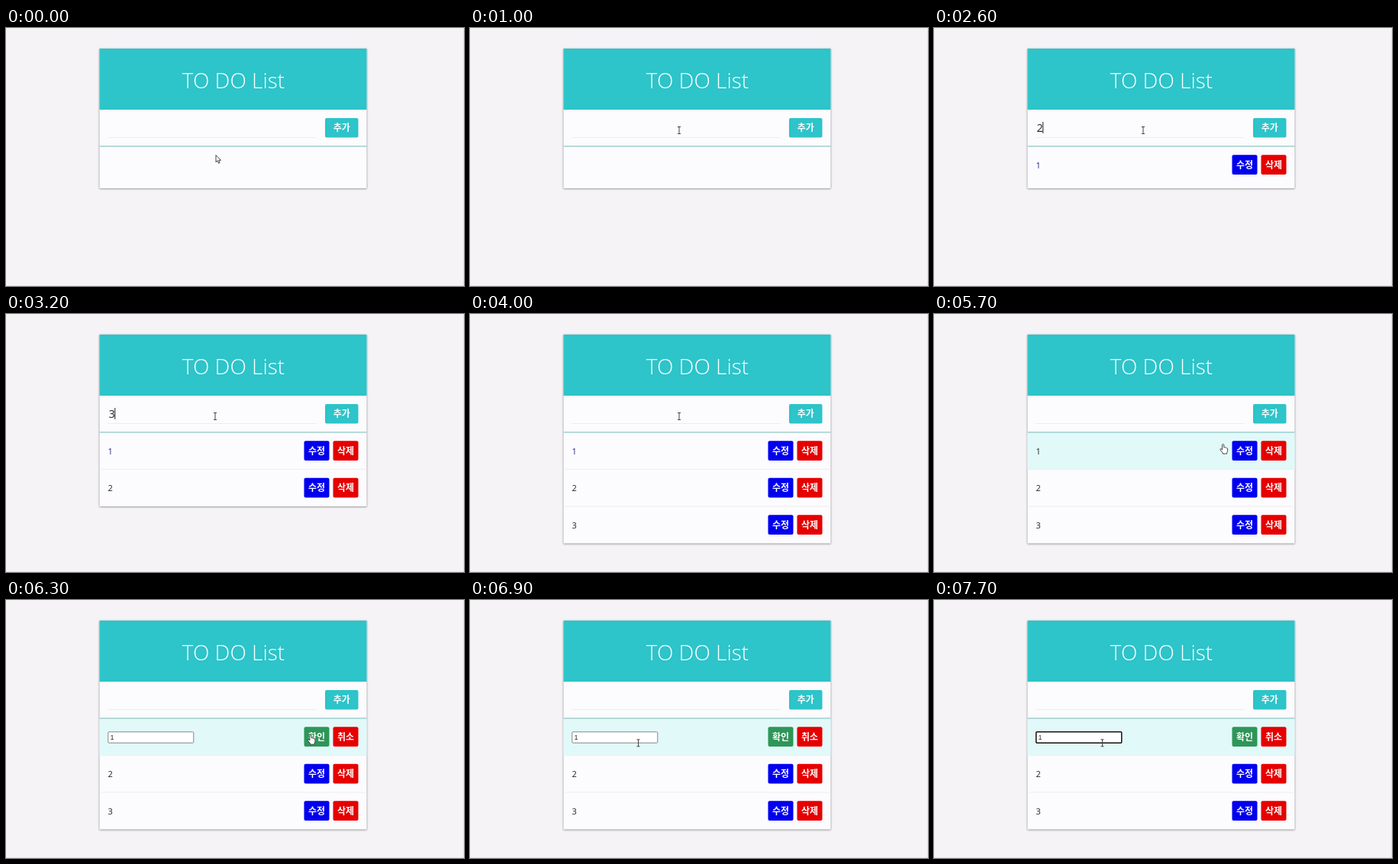
Animation, 600 px wide and 338 px high, one loop 8000 ms. Source, as an HTML page:

```html
<!DOCTYPE html>
<html lang="ko">
<head>
<meta charset="utf-8">
<title>TO DO List</title>
<style>
  html, body { margin: 0; width: 100%; height: 100%; overflow: hidden; background: #f5f3f6; }
  svg { display: block; width: 100%; height: 100%; }
  text { font-family: "Open Sans", "Noto Sans", sans-serif; fill: #222; }
  .title { font-size: 28px; font-weight: 300; fill: #fff; text-anchor: middle; }
  .label { font: 700 12px "Noto Sans CJK KR", "Noto Sans CJK", "Noto Sans CJK JP", sans-serif; fill: #fff; text-anchor: middle; }
  .typed { font-size: 14.5px; }
  .item { font-size: 11px; }
  .small { font: 9px "Liberation Sans", sans-serif; }
  .card { filter: drop-shadow(0 1px 1.2px rgba(0,0,0,.26)) drop-shadow(0 .7px .8px rgba(0,0,0,.26)); }
  .pointer { fill: #fff; stroke: #333; stroke-width: .9; stroke-linejoin: round; }
  .beam { fill: none; stroke: #444; stroke-width: 1; }
</style>
</head>
<body>
<svg id="stage" viewBox="0 0 600 338" preserveAspectRatio="none"></svg>
<script>
const LOOP = 8000, STEP = 100;
const ROW_TOP = 155, ROW_H = 48.5, CARD_X = 122.5, CARD_W = 350;
const stage = document.getElementById('stage');

function add(parent, tag, attrs, content) {
  const el = document.createElementNS('http://www.w3.org/2000/svg', tag);
  for (const key in attrs) el.setAttribute(key, attrs[key]);
  if (content !== undefined) el.textContent = content;
  parent.appendChild(el);
  return el;
}
const rect = (parent, x, y, width, height, fill, more) =>
  add(parent, 'rect', { x, y, width, height, fill, ...more });
const text = (parent, cls, x, y, content) => add(parent, 'text', { class: cls, x, y }, content);
const show = (el, on) => el.setAttribute('visibility', on ? 'inherit' : 'hidden');

function button(parent, x, y, width, height, fill, label) {
  const box = rect(parent, x, y, width, height, fill, { rx: 2 });
  const caption = text(parent, 'label', x + width / 2, y + height / 2 + 4.4, label);
  return { box, caption };
}

// Static page
rect(stage, 0, 0, 600, 338, '#f5f3f6');
rect(stage, 599, 0, 1, 338, '#e5e3e6');
rect(stage, 0, 337, 600, 1, '#e9e7ea');
const card = rect(stage, CARD_X, 27, CARD_W, 183, '#fcfbfe', { class: 'card' });
rect(stage, CARD_X, 27, CARD_W, 80, '#2dc4ca');
text(stage, 'title', 298, 78.5, 'TO DO List');
rect(stage, 133, 143, 273.5, 1, '#ebeef1');
button(stage, 418, 118, 43.5, 25.5, '#2dc4ca', '추가');
const typed = text(stage, 'typed', 134.6, 135.6, '');
const caret = rect(stage, 135, 123, 1, 15, '#222');

// List rows
const rows = [1, 2, 3].map(n => {
  const g = add(stage, 'g');
  const top = ROW_TOP + (n - 1) * ROW_H;
  const back = rect(g, CARD_X, top, CARD_W, ROW_H, '#e2f9f9', { opacity: 0 });
  const rule = n > 1 ? rect(g, CARD_X, top - .5, CARD_W, 1, '#efedf1') : null;
  const name = text(g, 'item', 133.4, top + 28.7, n);
  const edit = button(g, 390.5, top + 11.2, 33, 25.8, '#0000ee', '수정');
  const remove = button(g, 428.5, top + 11.2, 33, 25.8, '#e60000', '삭제');
  return { g, back, rule, name, edit, remove };
});
rect(stage, CARD_X, 154.3, CARD_W, 1.3, '#95c9c8');

// Inline editor of the first row
const editor = add(stage, 'g');
const field = rect(editor, 133.8, 172.8, 112, 14.4, '#fff', { rx: 1.2 });
text(editor, 'small', 136.4, 183, '1');
const editCaret = rect(editor, 141, 174.5, 1, 10, '#222');

// Mouse shapes, each drawn around its hot spot
const shapes = {
  arrow: add(stage, 'path', { class: 'pointer', d: 'M0 0V9.2L2.1 7.3L3.6 10.7L5.1 10L3.7 6.8H6.5Z' }),
  beam: add(stage, 'path', { class: 'beam', d: 'M-2 -4.5H2M0 -4.5V4.5M-2 4.5H2' }),
  hand: add(stage, 'path', {
    class: 'pointer',
    d: 'M-1.1 .7Q0 -.7 1.1 .7V4.3Q2.2 3.6 2.9 4.6Q4 4.1 4.6 5.2Q5.9 5 5.9 6.4' +
       'V9Q5.8 10.6 4.9 11.6V12.7H-.4V11.6L-3.8 7.4Q-4 5.8 -2.5 6.3L-1.1 7.5Z'
  })
};

// Mouse path: time, x, y
const path = [
  [0, 275, 166.5], [100, 275, 163], [400, 274, 134], [4500, 274, 134],
  [5000, 325, 149], [5200, 328, 151], [5400, 341.3, 159.2], [5900, 399, 176.5],
  [6300, 399, 176.5], [6900, 220.5, 187.3]
];
const keys = [[1600, '1', 1900], [2400, '2', 2800], [3200, '3', 3500]];
const CLICK = 500, EDIT = 6100, FOCUS = 7200, HOVER = 5300;

const clamp = v => Math.max(0, Math.min(1, v));
const smooth = v => v * v * (3 - 2 * v);

function mouseAt(t) {
  const i = path.findIndex(p => p[0] > t);
  if (i < 0) return path[path.length - 1].slice(1);
  const [t0, x0, y0] = path[i - 1], [t1, x1, y1] = path[i];
  const k = smooth((t - t0) / (t1 - t0));
  return [x0 + (x1 - x0) * k, y0 + (y1 - y0) * k];
}

function shapeAt(x, y, count, editing) {
  const inAdd = x > 133 && x < 407 && y > 116 && y < 145;
  const inEditor = editing && x > 133 && x < 246 && y > 172 && y < 188;
  if (inAdd || inEditor) return 'beam';
  return count && y > ROW_TOP ? 'hand' : 'arrow';
}

function draw(t) {
  const editing = t >= EDIT;
  const count = keys.filter(k => t >= k[2]).length;
  const entry = keys.find(k => t >= k[0] && t < k[2]);

  card.setAttribute('height', Math.max(183, 128 + count * ROW_H));
  rows.forEach((row, i) => {
    show(row.g, i < count);
    if (row.rule) show(row.rule, i < count);
  });

  const first = rows[0];
  first.back.setAttribute('opacity', smooth(clamp((t - HOVER) / 400)));
  first.name.style.fill = t < 4600 ? '#25287c' : '#222';
  show(first.name, count > 0 && !editing);
  first.edit.box.setAttribute('fill', editing ? '#2e9658' : '#0000ee');
  first.edit.caption.textContent = editing ? '확인' : '수정';
  first.remove.caption.textContent = editing ? '취소' : '삭제';

  typed.textContent = entry ? entry[1] : '';
  const lastPress = Math.max(CLICK, ...keys.map(k => k[0]).filter(k => k <= t));
  show(caret, t >= CLICK && !editing && (t - lastPress) % 1000 < 500);
  caret.setAttribute('x', entry ? 142.3 : 135);

  const focused = t >= FOCUS;
  show(editor, editing);
  field.setAttribute('stroke', focused ? '#111' : '#858585');
  field.setAttribute('stroke-width', focused ? 1.5 : 1);
  show(editCaret, focused && (t - FOCUS) % 1000 < 500);

  const [x, y] = mouseAt(t);
  const active = shapeAt(x, y, count, editing);
  for (const name in shapes) {
    show(shapes[name], name === active);
    shapes[name].setAttribute('transform', `translate(${x} ${y})`);
  }
}

function tick() {
  const t = performance.now() % LOOP;
  draw(Math.floor(t / STEP) * STEP);
  requestAnimationFrame(tick);
}
tick();
</script>
</body>
</html>
```
